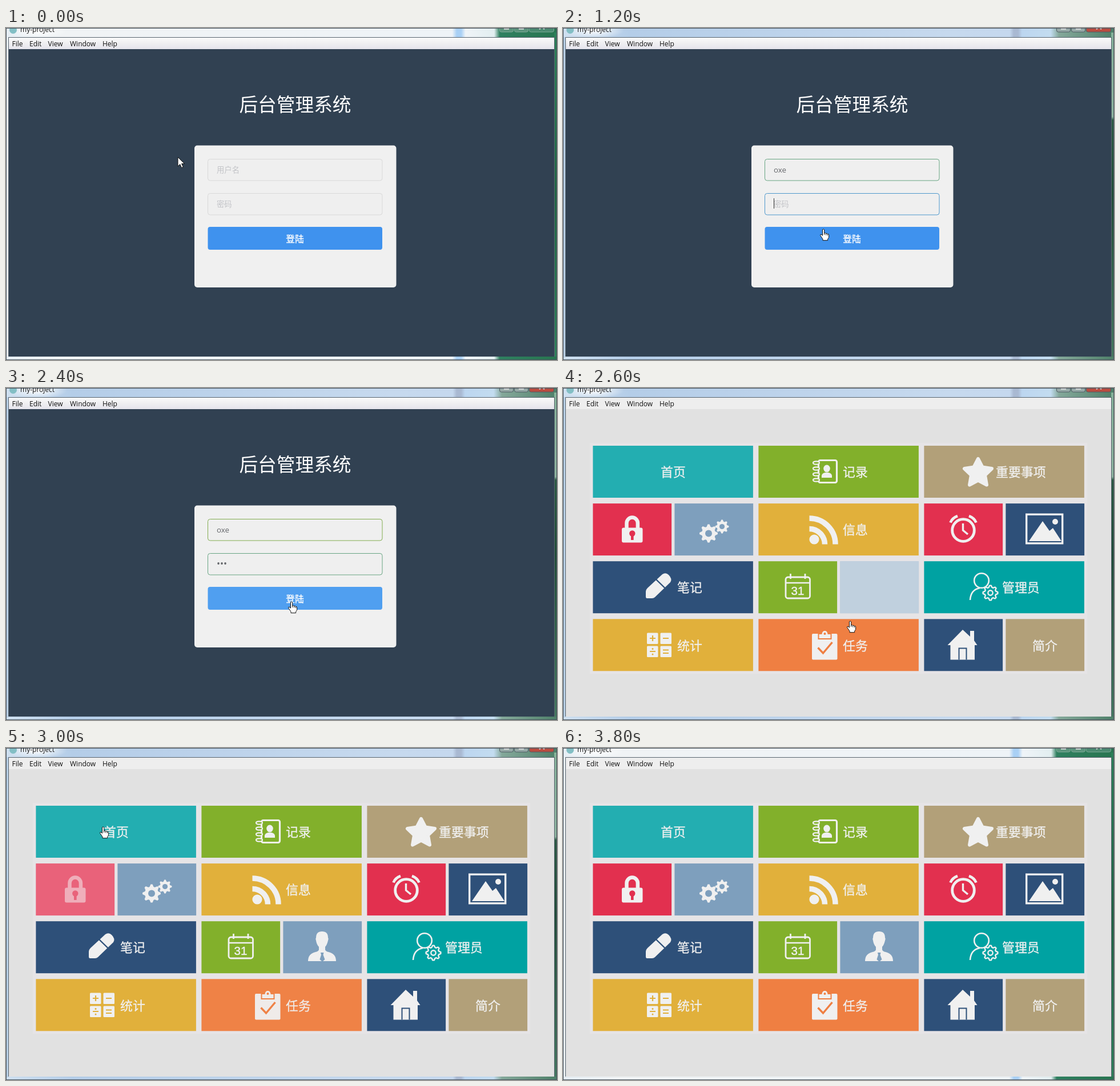
Animation of 965x581 px, one loop 4 s. Source, as an HTML page:

```html
<!DOCTYPE html>
<html lang="zh">
<head>
<meta charset="utf-8">
<title>my-project</title>
<style>
  html, body { margin: 0; width: 100%; height: 100%; overflow: hidden; background: #e1e1e1; }
  svg { display: block; width: 965px; height: 581px; }
  text { font-family: "Open Sans", "Noto Sans CJK SC", "Noto Sans CJK", sans-serif; }
  .menu { font-size: 12px; fill: #111; }
  .label { font-size: 21.9px; fill: #f0f0f0; stroke: #f0f0f0; stroke-width: 0.3px; }
  .date { font: 20.5px "Liberation Sans", sans-serif; stroke: #f0f0f0; stroke-width: 0.5px; }
  .hint { font-size: 13.33px; fill: #c3c4c8; }
  .value { font-size: 13.33px; fill: #65676b; }
  .icon { fill: #f0f0f0; }
  .line { fill: none; stroke: #f0f0f0; }
</style>
</head>
<body>
<script>
const rect = (x, y, w, h, fill, more = '') =>
  `<rect x="${x}" y="${y}" width="${w}" height="${h}" fill="${fill}" ${more}/>`;
const text = (x, y, cls, str, more = '') => `<text x="${x}" y="${y}" class="${cls}" ${more}>${str}</text>`;
const dot = (x, y, r, more = '') => `<circle cx="${x}" cy="${y}" r="${r}" ${more}/>`;
const path = (d, more = '') => `<path d="${d}" ${more}/>`;
const line = (d, width, more = '') => path(d, `class="line" stroke-width="${width}" ${more}`);

function gear(x, y, r, teeth, more = '') {
  const points = [];
  for (let i = 0; i < teeth * 4; i++) {
    const angle = (i - 0.5) * Math.PI / (teeth * 2);
    const radius = i % 4 < 2 ? r : r * 0.76;
    points.push((x + radius * Math.cos(angle)).toFixed(1) + ',' + (y + radius * Math.sin(angle)).toFixed(1));
  }
  return `<polygon points="${points.join(' ')}" stroke-linejoin="round" ${more}/>`;
}

const color = {
  aqua: '#23aeb1', green: '#82b02b', tan: '#b2a079', red: '#e2304f', steel: '#7e9fbd',
  gold: '#e1b03b', navy: '#2e5079', teal: '#00a2a2', orange: '#ef7f42'
};
const fill = name => `fill="${color[name]}"`;

const icons = {
  book: rect(447.5, 126.5, 32, 39, 'none', 'rx="3" stroke="#f0f0f0" stroke-width="3.2"') +
    [131, 141, 151, 161].map(y =>
      `<ellipse cx="443.5" cy="${y}" rx="5.5" ry="2.6" fill="${color.green}" stroke="#f0f0f0" stroke-width="2.2"/>`).join('') +
    '<ellipse cx="462" cy="141" rx="5.8" ry="6.5"/>' + path('M453 157v-4q1-4 6-5h6q5 1 6 5v4z'),
  star: path('M727 124l7.5 14.5 16.5 2.5-12 11.5 3 17-15-8-15 8 3-17-12-11.5 16.5-2.5z',
    'stroke="#f0f0f0" stroke-width="6" stroke-linejoin="round"'),
  lock: rect(103, 244.5, 36.5, 26, '#f0f0f0', 'rx="3"') +
    line('M111.5 246v-9.5a9.7 10 0 0 1 19.4 0v9.5', 6.5) +
    dot(121.3, 254.5, 5.2, fill('red')) + rect(119, 256, 4.6, 10, color.red),
  gears: gear(255, 254.5, 16, 8) + dot(255, 254.5, 6, fill('steel')) +
    gear(278.5, 242.5, 12, 8) + dot(278.5, 242.5, 4.6, fill('steel')),
  feed: dot(440, 265, 8.6) + line('M431.5 228A45.5 45 0 0 1 477 273.5', 9.5) +
    line('M431.5 246.5A27 27 0 0 1 458.5 273.5', 9.5),
  clock: dot(701, 249, 19.3, 'class="line" stroke-width="4.8"') + line('M700.5 237v12l8.5 7', 3.4) +
    line('M678.5 235.5q3-8 12.5-11.500M723.500 235.500q-3-8-12.500-11.500', 4.6),
  picture: rect(811.7, 221.2, 63, 50.6, 'none', 'stroke="#f0f0f0" stroke-width="3.4"') +
    path('M816 268l24-35 12 17 6-5 15 23z') + dot(862, 234, 5),
  pencil: path('M145 365v-9q0-3 3-6l26-24q6-4 11 1 7 7 3 13l-27 26q-2 2-5 2h-9q-2 0-2-3z') +
    line('M162 334l18.5 18', 2.4, `style="stroke:${color.navy}"`),
  calendar: rect(390, 331, 42.5, 37, 'none', 'rx="4" stroke="#f0f0f0" stroke-width="2.8"') +
    line('M390 341h42', 2.4) + line('M398.5 325v9M424 325v9', 2.8) +
    text(411, 361.5, 'date', '31', 'text-anchor="middle"'),
  person: path('M543 332q0-11 10.5-11t10.5 11q1.5 2 0 5-2 8-5 11v5q1 3 6 4 13 3 13 16h-49q0-13 13-16 5-1 6-4v-5q-4-4-5-11-1.5-3 0-5z') +
    path('M551 358h5.5l-1 4 3 8-4.5 4-4.5-4 2.5-8z', fill('steel')),
  admin: dot(733, 337, 12.8, 'class="line" stroke-width="2.6"') + line('M713 371q1-18 17-21', 2.6) +
    gear(748.5, 358.5, 13, 8, `fill="${color.teal}" stroke="#f0f0f0" stroke-width="2.4"`) +
    dot(748.5, 358.5, 4.2, 'class="line" stroke-width="2.4"'),
  calc: [[147, 428.5], [170.5, 428.5], [147, 451.5], [170.5, 451.5]]
      .map(([x, y]) => rect(x, y, 19.5, 19.5, '#f0f0f0', 'rx="1.5"')).join('') +
    path('M152 438h10M157 433v10M175 438h10M152 461h10M175 458.5h10M175 464h10',
      `stroke="${color.gold}" stroke-width="2.2"`) +
    dot(157, 456.5, 1.5, fill('gold')) + dot(157, 466, 1.5, fill('gold')),
  task: rect(436, 430, 44.5, 45.5, '#f0f0f0', 'rx="2"') +
    path('M447.5 439v-9h5q1-6 6-6t6 6h5v9z', `stroke="${color.orange}" stroke-width="2"`) +
    dot(458.5, 430, 2, fill('orange')) +
    line('M446.5 454.5l9 9.5 16-19', 3.4, `style="stroke:${color.orange}"`),
  house: path('M673.5 450L700 423l13 12v-10h7v17l5.5 8h-4.5v25.5h-42.5V450z') +
    path('M693.5 475.5v-20h13v20', `fill="none" stroke="${color.navy}" stroke-width="2"`)
};

// x, row, wide, colour, icon, label, label x
const tiles = [
  [52, 0, 1, 'aqua', '', '首页', 171],
  [342, 0, 1, 'green', 'book', '记录', 490],
  [632, 0, 1, 'tan', 'star', '重要事项', 758],
  [52, 1, 0, 'red', 'lock'],
  [195, 1, 0, 'steel', 'gears'],
  [342, 1, 1, 'gold', 'feed', '信息', 490],
  [632, 1, 0, 'red', 'clock'],
  [775, 1, 0, 'navy', 'picture'],
  [52, 2, 1, 'navy', 'pencil', '笔记', 200],
  [342, 2, 0, 'green', 'calendar'],
  [485, 2, 0, 'steel', 'person'],
  [632, 2, 1, 'teal', 'admin', '管理员', 769],
  [52, 3, 1, 'gold', 'calc', '统计', 200],
  [342, 3, 1, 'orange', 'task', '任务', 490],
  [632, 3, 0, 'navy', 'house'],
  [775, 3, 0, 'tan', '', '简介', 822]
];

function tile([x, row, wide, shade, icon, label, labelX], hover) {
  const y = 101 + row * 101.1, w = wide ? 280.5 : 137.7, h = hover[icon] || 0;
  return rect(x + 0.4, y, w, 91, color[shade]) +
    `<g class="icon" opacity="${1 - h}">${icons[icon] || ''}${label ? text(labelX, y + 54.2, 'label', label) : ''}</g>` +
    (h ? rect(x + 0.4, y, w, 91, '#fff', `opacity="${h * 0.51}"`) : '');
}

const dashboard = s => rect(5, 37, 955, 538, '#e1e1e1') + rect(47, 96, 871, 404, '#e6e4e6') +
  tiles.map(t => tile(t, s.hover)).join('');

const field = (y, stroke) => rect(353.5, y + 0.5, 305.5, 37.5, '#efefef', `rx="4" stroke="${stroke}"`);
const caret = (x, y) => rect(x, y, 1, 18, '#333');

const login = s => rect(5, 37, 955, 538, '#314152') +
  text(506.5, 145.5, '', '后台管理系统', 'text-anchor="middle" fill="#fff" font-size="32.7"') +
  rect(330, 205.5, 353.5, 248.5, '#f0f0f0', 'rx="5"') +
  field(229, s.userLine) + field(289, s.passLine) +
  text(369, 253, s.user ? 'value' : 'hint', s.user || '用户名') +
  (s.pass ? text(369, 313.4, 'value', s.pass, 'style="font-size:16px"') : text(369, 312.5, 'hint', '密码')) +
  rect(353.5, 348, 305.5, 40, s.button, 'rx="4"') +
  text(506, 374.8, '', '登陆', 'text-anchor="middle" fill="#fff" stroke="#fff" stroke-width="0.3" font-size="15.8"') +
  (s.caret ? caret(...s.caret) : '');

const stop = (at, c) => `<stop offset="${at}" stop-color="${c}"/>`;
const gradient = (id, stops, vertical) =>
  `<linearGradient id="${id}" ${vertical ? 'x2="0" y2="1"' : ''}>${stops.map(s => stop(...s)).join('')}</linearGradient>`;

const defs = `<defs>
  ${gradient('glassOn', [[0, '#cfe0f0'], [0.12, '#b4cde8'], [0.7, '#c6d9ee'], [0.811, '#c5d8ee'], [0.818, '#a9b9d2'],
    [0.826, '#a9b9d2'], [0.833, '#bcd6f0'], [0.885, '#c3dcf0'], [0.9, '#84a89a'], [1, '#4e8069']])}
  ${gradient('glassOff', [[0, '#e6eef4'], [0.1, '#f0f3f5'], [0.81, '#eef3f7'], [0.818, '#a9d0f5'],
    [0.826, '#a9d0f5'], [0.834, '#eff4f8'], [0.886, '#e2eef0'], [0.896, '#2f8060'], [1, '#287550']])}
  ${gradient('edgeOn', [[0, '#86b39a'], [0.26, '#8fb5a0'], [0.27, '#2b5a43'], [0.5, '#1f4c37'], [1, '#44795f']], true)}
  ${gradient('edgeOff', [[0, '#2d8159'], [0.5, '#1f6443'], [1, '#2d8159']], true)}
  ${gradient('bar', [[0, '#fafafa'], [0.45, '#f0f0f2'], [1, '#e5e4ec']], true)}
  <radialGradient id="glow">${stop(0, '#fff')}<stop offset="1" stop-color="#fff" stop-opacity="0"/></radialGradient>
</defs>`;

function chrome({ active, page }) {
  const mode = active ? 'On' : 'Off';
  const control = (x, w, shade) => path(`M${x}-2h${w}v6q0 3-3 3h${6 - w}q-3 0-3-3z`,
    `fill="${shade}" stroke="${active ? '#4d5a63' : '#7da897'}"`);
  return defs + rect(0, 0, 965, 581, `url(#glass${mode})`) +
    rect(0, 16, 4, 560, active ? '#b9d0e6' : '#e9eff5') +
    rect(960, 8, 5, 567, `url(#edge${mode})`) +
    '<ellipse cx="55" cy="4" rx="52" ry="15" fill="url(#glow)"/>' +
    dot(12.5, 3.5, 6.5, 'fill="#83bfc5"') + text(25, 7, 'menu', 'my-project') +
    control(864.5, 24, active ? '#97aaa8' : '#5b947d') + control(890.5, 24, active ? '#97aaa8' : '#5b947d') +
    control(916.5, 43, active ? '#bb4c40' : '#4a8a70') +
    path('M872 1.5h9M898 1.5h9M934 2l3-2M943 2l-3-2', 'stroke="#f0f0f0" stroke-width="2"') +
    rect(4.5, 16.5, 956, 558, '#f0f0f0', 'stroke="#59656f"') +
    rect(5, 17, 955, 20, page === login ? 'url(#bar)' : '#eeeeee') +
    [[10.5, 'File'], [41, 'Edit'], [73.5, 'View'], [112, 'Window'], [169, 'Help']]
      .map(([x, name]) => text(x, 31.7, 'menu', name)).join('') +
    rect(0.5, 0.5, 964, 580, 'none', 'stroke="#46525c"');
}

const cursors = {
  none: '',
  arrow: path('M0 0v16l3.8-3.5 2.7 6 2.8-1.2-2.7-5.8h5z', 'fill="#fff" stroke="#111"'),
  beam: path('M-3.5-7.5h2.5l1 1 1-1h2.5M0-6.5v13M-3.5 7.5h2.5l1-1 1 1h2.5', 'fill="none" stroke="#111" stroke-width="1.2"'),
  hand: path('M4.5 1.8q1.8-1.8 3.2.2v6q1.6-1 3 .6 1.6-.8 2.7.8 2.1-.3 2.2 1.8v4.3l-2 3v2.2h-8.6v-2.2L.8 12.2q-.7-2 1.4-2l2.3 2z',
    'fill="#fff" stroke="#111" stroke-linejoin="round"') + path('M7.7 8v3M10.7 9v2.5M13.4 10v2', 'stroke="#111"')
};

const GRAY = '#d9d9d9', BLUE = '#4f98cc', MIX = '#68a583', GREEN = '#83ad51';
const start = {
  active: false, page: login, cursor: 'arrow', x: 301, y: 226, user: '', pass: '', caret: null,
  userLine: GRAY, passLine: GRAY, button: '#3f92ee', hover: {}
};
// Each entry lists only what changes at that time.
const changes = {
  200: { cursor: 'beam', x: 410, y: 272 },
  400: { x: 436, y: 273 },
  600: { active: true, userLine: BLUE, caret: [369, 239] },
  800: { user: 'o', caret: [377, 239], x: 438, y: 282 },
  1000: { user: 'oxe', caret: [392, 239], x: 451, y: 307 },
  1200: { userLine: MIX, passLine: BLUE, caret: [369, 298], cursor: 'hand', x: 450, y: 351 },
  1400: { userLine: GREEN, pass: '•', caret: [375, 298], cursor: 'beam', x: 451, y: 320 },
  1600: { pass: '•••', caret: [386, 298], x: 453, y: 327 },
  1800: { cursor: 'hand', x: 471, y: 363, button: '#509ff0' },
  2000: { caret: null, x: 493, y: 372 },
  2200: { caret: [386, 298], x: 494, y: 373 },
  2400: { caret: null, passLine: MIX },
  2600: { page: dashboard, x: 497, y: 407, hover: { person: 1 } },
  2800: { x: 120, y: 236, hover: { person: 0.3, task: 0.2 } },
  3000: { x: 164, y: 137, hover: { lock: 0.48, task: 0.04 } },
  3200: { cursor: 'arrow', x: 99, y: -4, hover: {} },
  3400: { cursor: 'none' },
  3800: { active: false }
};
const STEP = 200, LOOP = 4000;
const states = [];
for (let time = 0, state = start; time < LOOP; time += STEP) {
  state = { ...state, ...changes[time] };
  states.push(state);
}

document.body.innerHTML = '<svg viewBox="0 0 965 581"></svg>';
const stage = document.querySelector('svg');
let shown = -1;

function draw() {
  const index = Math.floor(performance.now() % LOOP / STEP);
  if (index !== shown) {
    const s = states[index];
    stage.innerHTML = chrome(s) + s.page(s) +
      `<g transform="translate(${s.x} ${s.y})">${cursors[s.cursor]}</g>`;
    shown = index;
  }
  requestAnimationFrame(draw);
}
draw();
</script>
</body>
</html>
```
